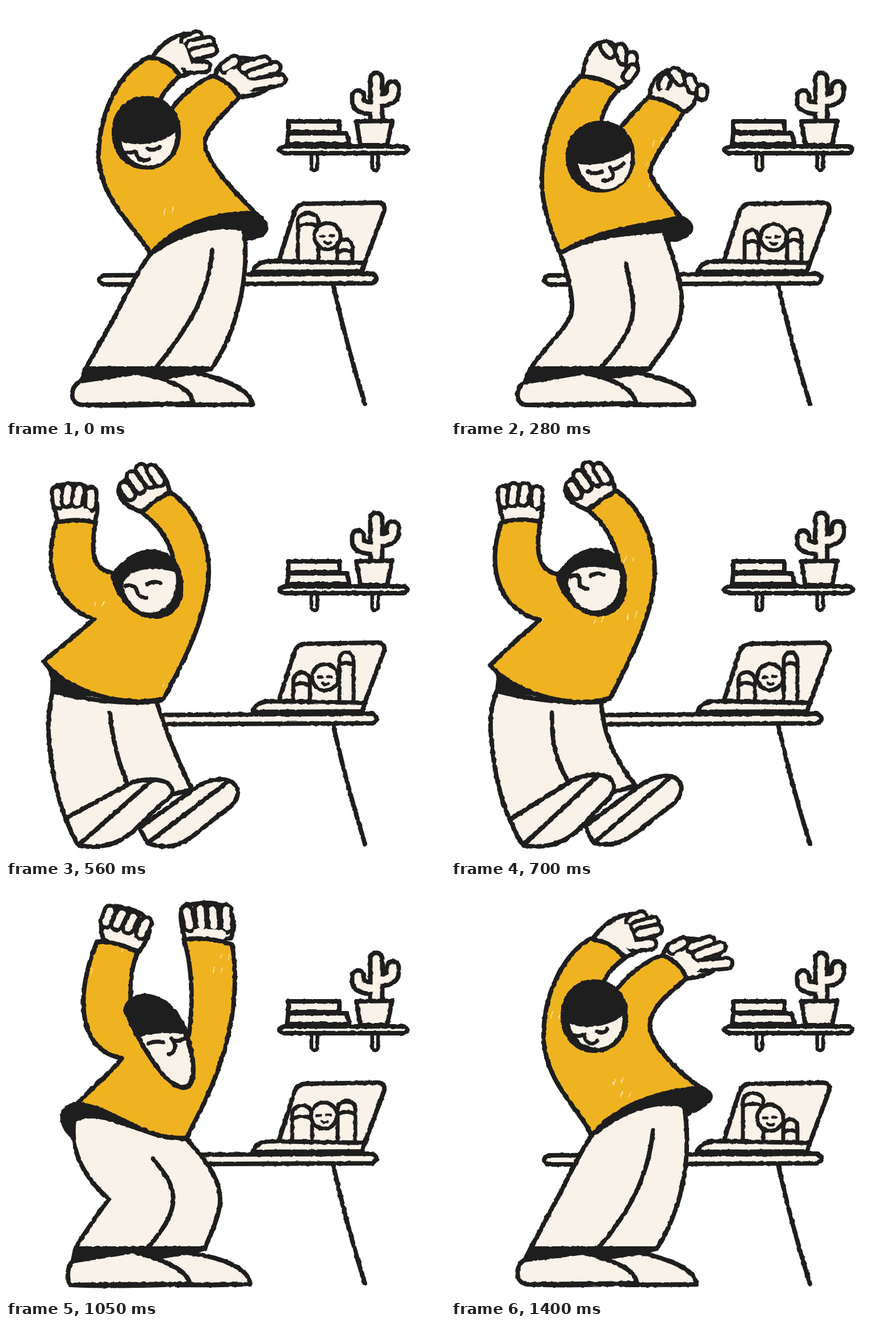
These frames come from a looping animation (773 by 725 pixels, 1.47 s). An HTML page:

```html
<!DOCTYPE html>
<html lang="en">
<head>
<meta charset="utf-8">
<title>Stretch break</title>
<style>
html, body { margin: 0; height: 100%; overflow: hidden; background: #fff }
svg { display: block; width: 100vw; height: 100vh }
</style>
</head>
<body>
<svg viewBox="0 0 773 725">
  <filter id="rough" filterUnits="userSpaceOnUse" x="0" y="0" width="773" height="725" color-interpolation-filters="sRGB">
    <feTurbulence id="grain" type="fractalNoise" baseFrequency=".14" numOctaves="1"/>
    <feDisplacementMap in="SourceGraphic" scale="4" xChannelSelector="R" yChannelSelector="G"/>
  </filter>
  <g id="scene" filter="url(#rough)" fill="none" stroke-linecap="round" stroke-linejoin="round"></g>
</svg>
<script>
const INK = '#1e1e1e', CREAM = '#f9f2e9', AMBER = '#efb321';
const STEP = 70, STEPS = 21;
const keys = [0, 4, 8, 12, 15, 17, 20];
const poses = text => text.trim().split('\n');

// Each part has one line per key pose; numbers are eased between lines.
const sweater = poses(`
M252 90Q287 94 306 122C290 140 270 155 266 185Q275 200 287 188C305 160 340 130 365 123Q395 134 411 160C385 190 352 215 350 242C352 275 405 330 440 365C370 362 300 385 254 437C235 395 166 345 163 265C164 180 205 110 252 90Z
M228 124Q265 124 296 146C278 165 265 185 262 220Q270 240 297 215C310 200 328 180 347 160Q385 165 409 187C395 215 365 250 350 290C355 315 385 345 404 372C340 388 265 390 192 435C175 395 160 350 160 310C160 240 180 170 228 124Z
M88 135Q125 126 158 135C150 175 148 223 192 223Q245 260 297 212C292 170 270 140 240 118Q262 92 291 82C335 115 358 165 357 225C355 300 310 385 278 444C215 462 110 435 66 379C95 355 125 330 155 305C85 280 65 215 88 135Z
M92 132Q125 122 157 132C150 175 150 217 190 228Q245 260 297 207C287 165 268 130 245 110Q268 92 296 78C340 110 362 165 361 225C360 300 310 385 288 442C220 465 130 440 76 393C100 360 130 335 160 307C90 295 58 215 92 132Z
M160 98Q200 98 232 117C215 155 222 185 218 215Q270 280 322 262C330 210 328 140 313 94Q355 88 398 103C408 160 402 215 392 260C375 335 345 390 318 443C240 450 195 390 125 384C150 355 180 335 204 303C128 290 120 195 160 98Z
M195 173Q225 182 250 211C235 235 220 255 207 278Q275 320 345 298C375 270 360 245 338 215Q370 188 405 184C430 215 450 255 442 275C405 340 360 365 345 473C280 440 180 440 117 467C130 435 160 385 181 342C95 315 122 240 195 173Z
M245 93Q285 98 306 127C285 143 270 155 265 185Q275 200 288 188C305 160 345 130 372 122Q402 132 415 163C380 190 352 215 350 245C352 285 410 335 440 355C370 360 290 385 247 440C235 400 165 350 163 265C163 180 205 115 245 93Z`);

const hem = poses(`
M254 437C256 437 258 437 260 437L425 408C462 408 468 385 440 365Q330 320 254 437Z
M192 435C194 437 196 438 200 438L385 412C415 412 442 388 404 372Q300 350 192 435Z
M66 379C85 395 82 410 82 430L270 450C272 448 275 446 278 444Q180 380 66 379Z
M76 393C95 400 85 415 82 428L265 450C275 448 282 445 288 442Q180 380 76 393Z
M125 384C90 388 95 420 116 440L310 446C312 445 315 444 318 443Q210 360 125 384Z
M117 467C98 485 108 503 130 498L335 475C340 475 342 474 345 473Q240 420 117 467Z
M247 440C249 441 251 441 254 441L417 400C450 385 475 370 440 355Q330 320 247 440Z`);

const pants = poses(`
M254 437C235 460 205 520 190 550C170 585 155 612 140 638L362 638C380 612 397 575 405 545C420 495 426 440 418 393C380 382 310 395 254 437Z
M192 435C205 465 217 520 212 540C210 560 165 600 140 638L350 638C365 612 400 580 405 540C412 490 390 445 375 395C330 400 250 400 192 435Z
M82 432C75 465 73 490 76 520C80 570 92 625 105 655L328 605C315 580 302 550 290 520C280 495 272 470 265 450C200 455 130 445 82 432Z
M80 430C66 460 66 490 70 520C74 570 85 620 104 660L325 595C300 570 278 535 270 505C264 485 264 468 264 450C200 455 130 442 80 430Z
M120 412C112 470 140 515 181 551C160 580 135 615 122 638L350 638C362 610 378 575 377 550C376 510 345 475 318 445C240 445 170 385 120 412Z
M136 478C140 515 165 545 190 542C165 570 135 615 118 638L343 640C360 610 390 570 392 545C392 515 365 490 345 473C310 450 170 450 136 478Z
M247 440C232 460 205 515 190 545C170 580 155 612 140 638L362 638C380 612 395 575 403 545C418 490 418 430 410 385C360 375 300 395 247 440Z`);

const inseam = poses(`
M363 430C358 500 330 555 266 634
M308 453C322 530 340 550 266 634
M183 470C188 520 198 555 212 590
M176 470C172 520 180 555 203 590
M259 480C300 530 315 560 252 634
M266 493C325 540 335 555 266 634
M356 430C348 500 325 560 262 634`);

const ankles = poses(`
M140 638L362 638L332 645L265 655L232 645L132 660Z
M140 638L350 638L330 645L262 655L232 645L130 662Z
M105 655L280 612L280 613L275 616L222 594L107 655Z
M104 660L270 602L270 603L265 606L205 590L106 660Z
M122 638L350 638L318 645L255 655L222 643L118 660Z
M118 640L343 640L330 643L262 655L235 643L112 668Z
M140 638L362 638L332 645L265 655L232 645L130 658Z`);

const nearShoe = poses(`
M132 660C112 668 110 702 135 702C200 704 265 702 329 699C330 675 290 658 232 645ZM135 702L329 699
M130 662C112 672 112 702 135 702C200 703 265 702 325 699C324 675 285 655 232 645ZM135 702L325 699
M105 655C112 672 118 690 128 703C215 718 235 655 285 622C310 595 270 578 222 592ZM128 702L255 590
M103 660C110 675 116 690 126 703C215 712 235 655 275 620C305 575 250 562 205 588ZM126 703L266 577
M118 660C105 670 108 702 115 702C180 705 260 703 323 700C322 675 270 655 222 643ZM115 702L323 700
M112 668C105 680 105 702 115 702C180 705 260 702 333 699C330 675 280 658 235 643ZM115 702L333 699
M130 658C112 666 112 700 135 701C200 704 265 702 327 699C326 675 285 658 232 645ZM135 701L327 699`);

const farShoe = poses(`
M265 655C280 670 290 690 300 702C345 702 390 702 434 701C430 675 390 658 332 645ZM300 702L434 701
M262 655C280 670 290 690 300 702C345 702 390 702 428 701C428 675 390 660 330 645ZM300 702L428 701
M235 672C240 682 244 692 250 699C310 720 330 680 395 635C430 600 390 570 340 597ZM250 698L392 590
M240 662C245 680 250 690 256 698C300 705 330 670 390 628C425 590 390 558 330 594ZM256 698L384 580
M255 655C275 665 290 690 300 702C345 703 390 702 430 701C428 675 390 655 318 645ZM300 702L430 701
M262 655C280 670 295 690 305 702C345 703 390 702 434 701C430 675 390 655 330 642ZM305 702L434 701
M265 655C280 670 290 690 300 702C345 702 390 702 432 701C430 675 390 658 332 645ZM300 702L432 701`);

const leftPalm = poses(`
M258 90C275 62 305 45 332 50C365 70 345 118 306 124Z
M232 124C235 90 250 55 280 64C320 85 345 125 296 146Z
M92 136C82 100 78 75 90 70C160 55 168 100 156 134Z
M94 132C88 105 85 80 98 72C165 60 172 100 157 130Z
M172 95C165 75 165 45 185 36C255 40 270 70 234 115Z
M205 172C215 145 230 120 250 122C290 140 310 195 252 208Z
M250 92C270 65 300 45 330 50C365 70 345 118 306 124Z`);

// Four fingers, then a line that opens the palm between them.
const leftFingers = poses(`
M318 62L336 54M326 70L357 64M332 84L362 77M322 108L350 107M308 75L316 100
M272 72L280 82M298 76L304 94M318 90L318 106M320 112L312 124M250 95L275 120
M90 81L92 100M109 75L107 98M129 76L125 98M150 82L149 104M108 120L140 119
M97 77L98 96M115 74L112 96M135 73L131 94M156 78L155 100M112 116L146 115
M183 44L176 64M204 49L195 68M224 55L215 74M247 64L238 84M188 88L224 99
M246 128L227 150M262 139L246 158M279 150L266 168M283 180L270 190M225 172L252 192
M318 62L335 54M326 72L356 64M332 84L362 77M322 105L352 102M306 75L316 102`);

const rightPalm = poses(`
M367 124C375 95 400 85 440 95C475 110 490 155 411 160Z
M349 160C352 130 370 110 400 112C440 130 440 175 411 186Z
M238 116C195 100 190 75 208 62C260 10 280 45 288 80Z
M243 108C205 95 205 65 222 55C265 5 290 45 293 78Z
M315 93C300 40 310 30 330 32C400 20 410 60 396 92Z
M338 212C300 190 295 165 312 160C350 115 385 140 390 182Z
M372 124C380 95 405 88 440 95C480 110 495 155 415 163Z`);

const rightFingers = poses(`
M386 108L402 97M420 108L455 98M432 122L474 108M435 138L483 130M398 120L428 140
M394 118L404 130M420 130L426 144M442 148L442 156M378 130L374 140M375 155L405 168
M209 72L218 86M222 54L236 74M238 41L254 64M257 42L270 62M240 98L270 82
M220 68L230 82M232 50L246 70M249 36L265 60M268 38L281 58M250 92L278 77
M318 45L324 70M342 40L344 70M364 42L366 70M387 42L389 72M338 84L378 86
M314 168L322 182M325 150L339 168M345 142L358 160M365 140L376 158M346 190L378 178
M390 110L408 100M425 108L455 98M435 122L474 108M440 140L486 136M402 125L430 142`);

const hair = poses(`
M190 223C190 142 304 142 304 223C304 304 190 304 190 223Z
M206 265C206 186 320 186 320 265C320 344 206 344 206 265Z
M188 230C228 164 308 175 308 245C312 320 215 322 188 230Z
M188 232C228 158 305 170 305 240C310 312 215 315 188 232Z
M210 218C222 174 305 185 325 285C350 400 275 370 210 218Z
M232 340C232 265 355 265 355 340C355 415 232 415 232 340Z
M197 229C197 148 308 148 308 229C308 310 197 310 197 229Z`);

const face = poses(`
M203 238C235 250 280 240 298 222C300 295 215 300 203 238Z
M224 278C250 282 295 275 316 256C325 335 240 345 224 278Z
M206 246C215 208 275 215 298 222C312 298 225 324 206 246Z
M206 240C210 195 270 215 295 218C308 294 225 318 206 240Z
M238 265C260 258 290 258 312 260C352 378 295 380 238 265Z
M258 374C280 383 315 383 340 372C325 398 278 398 258 374Z
M209 242C240 255 283 245 302 228C305 300 222 302 209 242Z`);

const features = poses(`
M210 257Q218 260 226 256M249 251Q260 256 271 248M229 256C230 270 240 274 252 270
M241 291Q252 297 266 292M284 288Q296 286 304 277M280 284C290 300 285 308 268 307
M210 246Q217 244 224 247M249 243Q260 236 271 241M224 247C235 250 225 266 247 267
M212 222Q218 216 226 220M245 221Q257 214 268 219M222 220C232 226 212 240 237 243
M251 277Q262 272 277 275M297 272Q308 274 316 267M291 268C302 280 298 295 286 296
M280 360Q285 362 290 361M305 361Q310 361 315 359M295 360C296 362 298 362 300 361
M215 262Q224 266 232 262M257 256Q266 262 275 252M235 262C236 276 246 282 258 272`);

// Caller on the laptop: left, right and top of both arms, then the head centre.
const caller = poses(`
514 550 378 583 610 424 566 405
517 542 408 592 617 406 568 407
506 535 412 587 612 376 562 407
506 535 410 585 609 378 562 406
504 539 400 584 615 392 560 404
506 547 384 586 610 416 566 403
514 550 378 585 610 424 562 408`);

const wrap = (i, n = keys.length) => (i + n) % n;

// Cubic easing through the key poses that never overshoots.
function tween(list, step) {
  const i = keys.findLastIndex(k => k <= step), j = wrap(i + 1);
  const rows = list.map(row => row.match(/\d+/g).map(Number));
  const gap = n => wrap(keys[wrap(n + 1)] - keys[n], STEPS);
  const u = (step - keys[i]) / gap(i);
  let col = 0;
  return list[0].replace(/\d+/g, () => {
    const at = n => rows[n][col];
    const rate = n => (at(wrap(n + 1)) - at(n)) / gap(n);
    const slope = n => {
      const a = rate(wrap(n - 1)), b = rate(n);
      return a * b > 0 ? 2 * a * b / (a + b) : 0;
    };
    const s = u * u * (3 - 2 * u);
    const bend = gap(i) * u * (1 - u) * ((1 - u) * slope(i) - u * slope(j));
    const value = at(i) + (at(j) - at(i)) * s + bend;
    col++;
    return Math.round(value * 10) / 10;
  });
}

const path = (d, fill, stroke = INK, width = 8) =>
  `<path d="${d}" fill="${fill}" stroke="${stroke}" stroke-width="${width}"/>`;
const line = (d, width = 8, color = INK) => path(d, 'none', color, width);
const tube = (d, outer, inner) => line(d, outer) + line(d, inner, CREAM);

const room =
  line('M576 490Q598 590 632 700') +
  path('M172 474L645 471Q660 480 645 488L172 490Q156 482 172 474Z', CREAM) +
  path('M480 450L508 362Q514 348 528 348L655 346Q668 347 666 360L628 462Z', CREAM) +
  path('M434 468Q440 450 465 449L632 452L627 467Z', CREAM) +
  tube('M543 262V284M650 262V284', 17, 4) +
  tube('M652 128V200M620 159V168Q620 180 652 180M681 143V152Q681 166 652 166', 29, 13) +
  path('M617 203L680 202L671 245L624 245Z', CREAM) +
  path('M497 203H587V222H497ZM497 224H600L605 243H495Z', CREAM) +
  path('M490 247L700 247Q714 252 700 259L490 259Q472 253 490 247Z', CREAM);

function callerArt(step) {
  const [l1, r1, y1, l2, r2, y2, x, y] = tween(caller, step).split(' ').map(Number);
  const arm = (l, r, top) => {
    const w = r - l;
    return path(`M${l} 446V${top}c2-18 ${w - 2}-18 ${w} 0V446M${l} ${top + 10}q${w / 2}-9 ${w} 0`, CREAM, INK, 7);
  };
  return arm(l1, r1, y1) + arm(l2, r2, y2) +
    path(`M${x - 23} ${y}a23 23 0 1 1 46 0a23 23 0 1 1-46 0Z`, CREAM, INK, 7) +
    line(`M${x - 12} ${y}h6M${x + 4} ${y - 1}h7M${x - 5} ${y + 10}q5 5 11 1`, 5);
}

function hand(palm, fingers, step) {
  const parts = tween(fingers, step).split('M').slice(1).map(p => 'M' + p);
  const opening = parts.pop();
  return path(tween(palm, step), CREAM) +
    parts.map(p => tube(p, 26, 12)).join('') + line(opening, 18, CREAM);
}

function scratches(step) {
  const random = n => { const v = Math.sin(n * 91.7 + step * 37.3 + 5) * 4375.5; return v - Math.floor(v) };
  let d = '';
  for (let i = 0; i < 6; i++) {
    const x = 110 + 280 * random(i), y = 100 + 320 * random(i + 20);
    for (let k = 0; k < 2; k++) {
      d += `M${x + k * 14} ${y + 9 * random(i + k + 40)}l-3 ${3 + 9 * random(i * 3 + k + 60)}`;
    }
  }
  return line(d, 1, '#fff');
}

function draw(step) {
  const top = tween(sweater, step);
  const part = (list, fill) => path(tween(list, step), fill);
  grain.setAttribute('seed', step + 1);
  scene.innerHTML = room + callerArt(step) +
    part(hem, INK) + part(pants, CREAM) + part(inseam, 'none') +
    part(ankles, INK) + part(farShoe, CREAM) + part(nearShoe, CREAM) +
    hand(leftPalm, leftFingers, step) + hand(rightPalm, rightFingers, step) +
    path(top, AMBER, 'none') +
    `<clipPath id="cloth"><path d="${top}"/></clipPath><g clip-path="url(#cloth)">${scratches(step)}</g>` +
    line(top) + part(hair, INK) + path(tween(face, step), CREAM, 'none') +
    line(tween(features, step), 7);
}

const grain = document.getElementById('grain'), scene = document.getElementById('scene');
const start = performance.now();
let shown = -1;
function tick() {
  const step = Math.floor((performance.now() - start) / STEP) % STEPS;
  if (step !== shown) draw(shown = step);
  requestAnimationFrame(tick);
}
tick();
</script>
</body>
</html>
```
